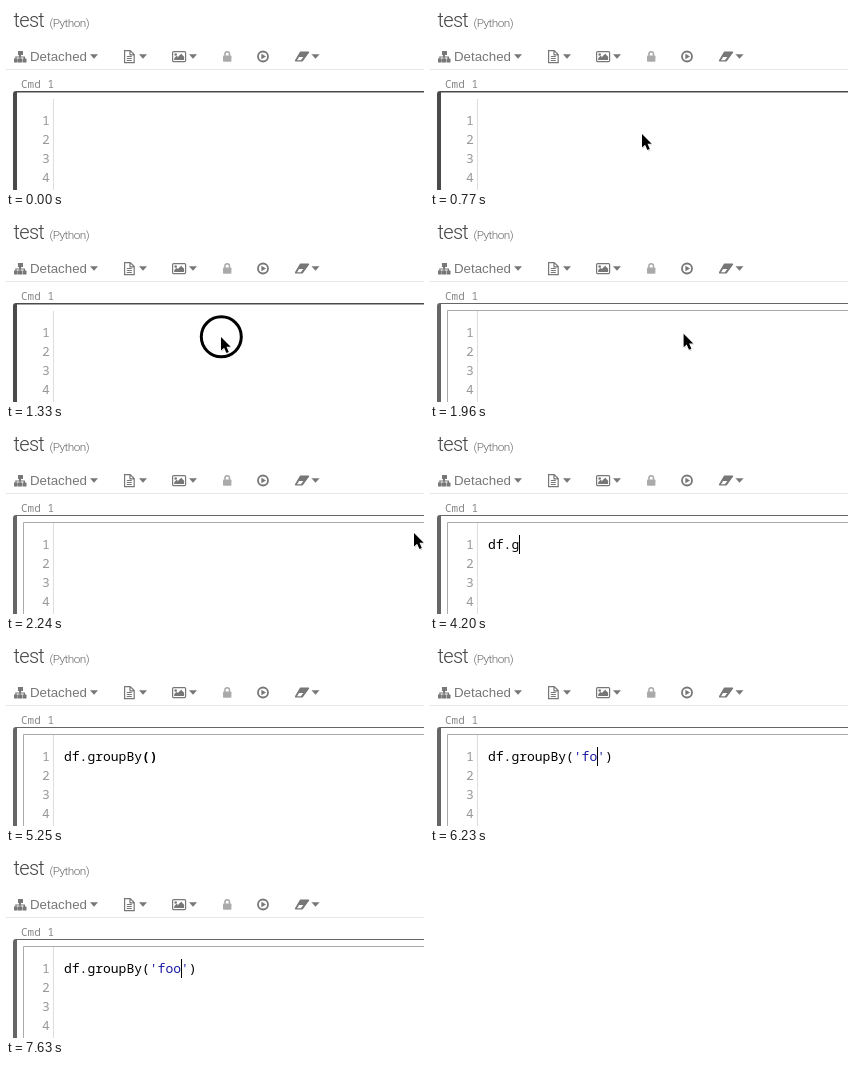
These frames come from a looping animation (418x184 px, 8000 ms). An HTML page:

```html
<!DOCTYPE html>
<html lang="en">
<head>
<meta charset="utf-8">
<title>Notebook cell</title>
<style>
html, body { margin: 0; width: 100%; height: 100%; overflow: hidden; background: #fff; }
svg { display: block; width: 418px; height: 184px; }
text { white-space: pre; }
.title { font-family: Roboto, "Liberation Sans", sans-serif; font-weight: 300; fill: #444; }
.menu { font: 13.3px "Liberation Sans", sans-serif; fill: #777; }
.code { font: 13px "Noto Sans Mono", monospace; fill: #000; }
.cmd { font: 11px "Noto Sans Mono", monospace; fill: #888; }
.num { font: 500 13px "Noto Sans Mono", monospace; fill: #999; }
.str { fill: #1a1aa6; }
.match { font-weight: bold; }
</style>
</head>
<body>
<svg viewBox="0 0 418 184">
  <defs><path id="drop" d="M0 0H8L4 4.5Z"/></defs>
  <rect width="418" height="184" fill="#fff"/>

  <text class="title" x="7.5" y="21" font-size="20" letter-spacing="-.7">test</text>
  <text class="title" x="43.5" y="21" font-size="11.8" letter-spacing="-.55" style="fill:#666">(Python)</text>

  <g fill="#777">
    <path d="M12 45h5v4h-2v1.5h4v2h1.5v4h-4v-4h1.2v-1h-3v1h1.3v4h-4v-4h1.5v-1h-3v1h1.2v4H8v-4h1.3v-2H13V49h-1Z"/>
    <text class="menu" x="24" y="55">Detached</text>
    <use href="#drop" x="84" y="48.3"/>
    <use href="#drop" x="133" y="48.3"/>
    <use href="#drop" x="183" y="48.3"/>
    <use href="#drop" x="305.5" y="48.3"/>
    <g fill="none" stroke="#777" stroke-width="1.2">
      <path d="M118.6 44.6h5.6l4 4v8h-9.6ZM124 44.6v4.2h4.2M120.8 50.5h5M120.8 52.5h5M120.8 54.5h5"/>
      <rect x="166.6" y="45.6" width="13" height="10" rx="1"/>
      <circle cx="257" cy="50.5" r="5" stroke-width="1.8"/>
    </g>
    <path d="M168.2 54v-1.8l2.3-2.4 1.4 1.3 3.2-3.4 3 3V54Z"/>
    <circle cx="169.7" cy="48.5" r="1.3"/>
    <path d="M255.4 47.7l4.6 2.8-4.6 2.8Z"/>
    <path d="M294.5 45.5h8.3l.4 1-6.2 8.5q-.4.6-1 .6h-6.4q-1.2-.4-.5-1.5l4.7-8q.3-.6.7-.6Z"/>
    <path d="M291 54.3l2.1-3.4h4.2l-2.4 3.4Z" fill="#fff"/>
  </g>
  <g fill="#aaa">
    <rect x="217" y="49.5" width="8.4" height="6.3" rx=".8"/>
    <path d="M218.9 50v-2a2.3 2.3 0 0 1 4.6 0v2" fill="none" stroke="#aaa" stroke-width="1.5"/>
  </g>
  <path d="M0 63.5H418" stroke="#e6e6e6"/>
  <text class="cmd" x="15" y="82">Cmd 1</text>

  <g id="idle">
    <path d="M7 184V88q0-3 3-3H418v1.5H11V184Z" fill="#4a4a4a"/>
  </g>
  <g id="focused">
    <path d="M7 184V88q0-3 3-3H418v1H11V184Z" fill="#666"/>
    <path d="M17.5 184V92.5H418" fill="none" stroke="#aaa"/>
  </g>
  <path d="M47.5 93V184" stroke="#ddd"/>
  <g id="nums"></g>

  <text id="code" class="code" x="58" y="119"></text>
  <rect id="caret" y="105" width="1" height="19"/>
  <circle id="ring" cx="215.3" cy="118.8" r="20" fill="none" stroke="#000" stroke-width="3"/>
  <g id="mouse">
    <path d="M0 0V13.5L3.1 10.7 5.4 16 7.8 15 5.5 9.8H9.7Z" transform="translate(.8 1.4)" fill="#000" opacity=".18"/>
    <path d="M0 0V13.5L3.1 10.7 5.4 16 7.8 15 5.5 9.8H9.7Z" stroke="#fff" stroke-width="1.6" paint-order="stroke"/>
  </g>
</svg>
<script>
const LOOP = 8000, STEP = 70, BLINK = 560, CHAR = 7.8;
const FOCUS = 1400, RING = 1260;
const $ = id => document.getElementById(id);
const show = (id, on) => $(id).setAttribute('visibility', on ? 'visible' : 'hidden');

// time, text before the caret, text after it
const edits = [
  [FOCUS, '', ''], [3150, 'd', ''], [3500, 'df', ''], [3640, 'df.', ''],
  [4200, 'df.g', ''], [4410, 'df.gr', ''], [4690, 'df.groupBy(', ')'],
  [5600, "df.groupBy('", "')"], [5880, "df.groupBy('f", "')"],
  [6230, "df.groupBy('fo", "')"], [6510, "df.groupBy('foo", "')"]
];

// time, x, y of the pointer tip
const path = [
  [70, 400, 45], [140, 210, 75], [210, 210, 75], [490, 211, 112],
  [770, 212, 128], [840, 212, 128], [1050, 215, 119], [1890, 215, 119],
  [2240, 408, 103], [2450, 424, 98]
];

function pointer(t) {
  const i = path.findIndex(p => p[0] > t);
  if (i < 1) return null;
  const [t0, x0, y0] = path[i - 1], [t1, x1, y1] = path[i];
  const k = (t - t0) / (t1 - t0);
  return [x0 + (x1 - x0) * k, y0 + (y1 - y0) * k];
}

const paint = text => text
  .replace(/'.*'/, s => `<tspan class="str">${s}</tspan>`)
  .replace('()', '<tspan class="match">()</tspan>');

function draw(t) {
  const focused = t >= FOCUS;
  show('idle', !focused);
  show('focused', focused);
  show('ring', t >= RING && t < FOCUS);

  const tip = pointer(Math.floor(t / STEP) * STEP);
  show('mouse', tip);
  if (tip) $('mouse').setAttribute('transform', `translate(${tip})`);

  const [start, before, after] = edits.filter(e => e[0] <= t).pop() || [0, '', ''];
  $('code').innerHTML = paint(before + after);
  $('caret').setAttribute('x', Math.floor(58.4 + CHAR * before.length));
  show('caret', focused && (t - start) % (2 * BLINK) < BLINK);
}

$('nums').innerHTML = [1, 2, 3, 4]
  .map(n => `<text class="num" x="36" y="${100 + 19 * n}">${n}</text>`).join('');

const begin = performance.now();
function tick() {
  draw((performance.now() - begin) % LOOP);
  requestAnimationFrame(tick);
}
tick();
</script>
</body>
</html>
```
